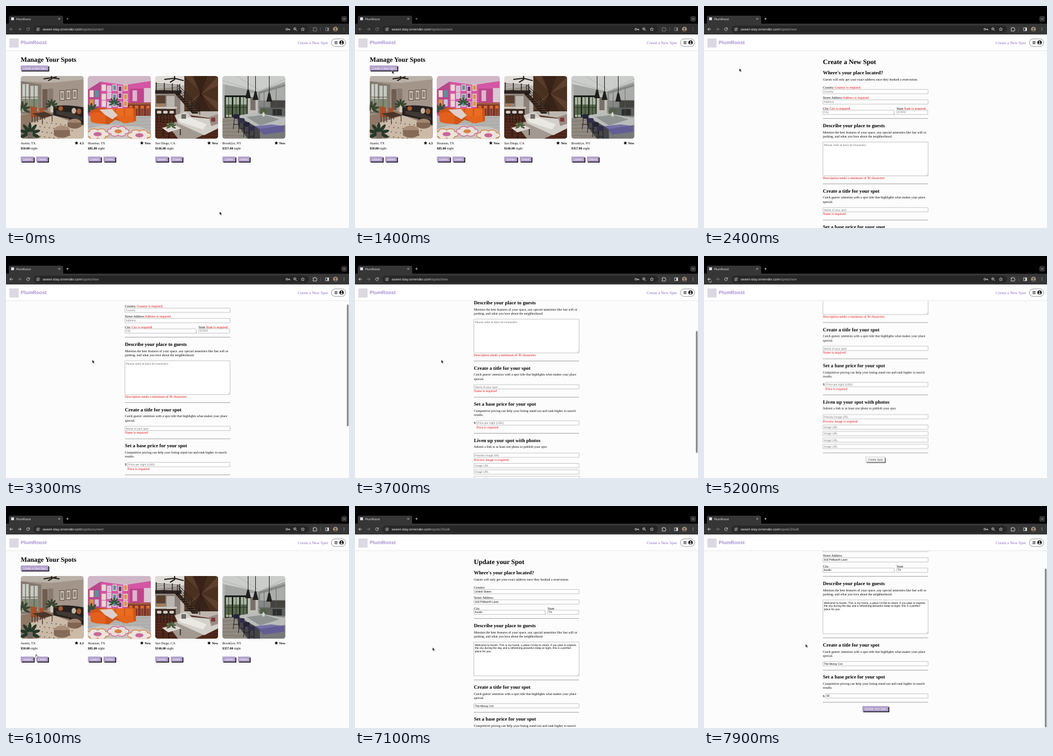
Animation of 600x390 px, one loop 8 s. Source, as an HTML page:

```html
<!DOCTYPE html>
<html lang="en">
<head>
<meta charset="utf-8">
<title>Manage Your Spots</title>
<style>
  html, body { margin: 0; width: 100%; height: 100%; overflow: hidden; background: #fcfcfc; }
  svg { display: block; width: 600px; height: 390px; }
  text { font: 5.8px "Liberation Serif", "Times New Roman", serif; white-space: pre; text-rendering: geometricPrecision; }
  .h1 { font-size: 11.7px; font-weight: bold; }
  .h2 { font-size: 8.75px; font-weight: bold; }
  .ui { font-family: "Liberation Sans", Arial, sans-serif; font-size: 4.83px; }
  .url { font-size: 6.2px; }
  .tab { font-size: 5.3px; }
  .brand { font-size: 8.6px; }
  .link { font-size: 7.05px; }
  .bold { font-weight: bold; }
  .mid { text-anchor: middle; }
  .end { text-anchor: end; }
  .error { fill: #e80000; }
</style>
</head>
<body>
<svg id="stage" viewBox="0 0 600 390"></svg>
<script>
const LOOP = 8000;
const BRAND = 'PlumRoost';

// Drawing helpers
const rect = (x, y, w, h, fill, more = '') =>
  `<rect x="${x}" y="${y}" width="${w}" height="${h}" fill="${fill}" ${more}/>`;
const round = (x, y, w, h, r, fill, more = '') => rect(x, y, w, h, fill, `rx="${r}" ${more}`);
const path = (d, fill, more = '') => `<path d="${d}" fill="${fill}" ${more}/>`;
const line = (d, color, width = 1) => path(d, 'none', `stroke="${color}" stroke-width="${width}"`);
const oval = (x, y, rx, ry, fill, more = '') =>
  `<ellipse cx="${x}" cy="${y}" rx="${rx}" ry="${ry}" fill="${fill}" ${more}/>`;
const ring = (x, y, r, color, width) => oval(x, y, r, r, 'none', `stroke="${color}" stroke-width="${width}"`);
const text = (x, y, value, kind = '', fill = '#000') =>
  `<text x="${x}" y="${y}" class="${kind}" fill="${fill}">${value}</text>`;
const group = (id, content) => `<g id="${id}">${content}</g>`;
const repeat = (n, draw) => Array.from({ length: n }, (_, i) => draw(i)).join('');

function star(cx, cy, r, fill, more) {
  const points = Array.from({ length: 10 }, (_, i) => {
    const a = i * Math.PI / 5, q = i % 2 ? r * .45 : r;
    return [cx + q * Math.sin(a), cy - q * Math.cos(a)].map(v => v.toFixed(2));
  });
  return path('M' + points.join('L') + 'Z', fill, more);
}

function button(x, y, w, label, h = 9) {
  return rect(x + 1.5, y + 1.5, w, h, '#120c18', 'rx=".5"') +
    rect(x, y, w, h, '#b2a0cb', 'rx=".5"') +
    text(x + w / 2, y + h / 2 + 1.7, label, 'ui mid', '#fff');
}

// Room pictures, each 110 by 110
function leaves(x, y, size, color) {
  return repeat(7, i =>
    oval(0, -size * .6, size * .17, size * .5, color, `transform="translate(${x} ${y}) rotate(${i * 38 - 114})"`));
}

function loungeRoom() {
  return rect(0, 0, 110, 110, '#a3958a') +
    path('M0 0H110V6L55 12L0 9Z', '#b9b1a8') +
    path('M0 9L36 15V66H0Z', '#85796e') +
    rect(3, 14, 11, 48, '#c9cec8') + rect(17, 17, 13, 44, '#c3c9c0') +
    rect(3, 40, 11, 20, '#87917b') + rect(17, 40, 13, 19, '#7d8972') +
    line('M3 37H31M8.500 14V62M23.500 17V61', '#574b42', 1) +
    line('M40 5L54 3L68 5M54 0V5L48 8M54 4L63 1', '#211c19', 2) +
    rect(38, 23, 9, 37, '#6f5d50') + rect(48, 22, 9, 33, '#8a7b70') +
    repeat(3, i => rect(68 + i * 11, 25 - i, 9, 18, '#57483f') + rect(69 + i * 11, 26 - i, 7, 16, '#c9bfb2') +
      rect(70.5 + i * 11, 29 - i, 4, 10, '#8f8276')) +
    path('M0 69L45 61L110 78V110H0Z', '#8f7865') +
    path('M12 84L58 69L110 88V110H30Z', '#cbbaa8') +
    repeat(9, i => repeat(4, j => oval(30 + i * 8 - j * 4, 80 + j * 8 + i, 1.3, .8, '#6a574a'))) +
    path('M56 53Q80 49 110 55V86L91 82L84 75L57 69Z', '#25211f') +
    path('M62 61L89 64L108 73V78L63 67Z', '#3f3833') +
    oval(70, 57, 4, 4, '#a9572f') + oval(93, 61, 4, 5, '#c3b5a4') + oval(102, 62, 4, 5, '#a35430') +
    path('M17 53L28 55L30 72H18Z', '#a9502a') + rect(33, 56, 8, 12, '#a9502a') +
    line('M20 71V81M29 70V80M35 67V77M42 66V76', '#2b1f1a', 1) +
    path('M20 66L42 63L57 69L38 74Z', '#4a3529') + line('M25 69V82M38 73V85M55 69V80', '#2f211a', 1) +
    rect(52, 52, 5, 12, '#cfc8bb') + leaves(54, 51, 10, '#37452f') +
    leaves(3, 58, 13, '#39462f') + leaves(16, 100, 17, '#26392a') + rect(12, 98, 9, 12, '#75695f') +
    oval(94, 82, 12, 7, '#a3866f') + path('M82 82V89Q94 96 106 89V82Z', '#806551') +
    oval(72, 95, 14, 8, '#a98d77') + path('M58 95V104Q72 113 86 104V95Z', '#846a57');
}

function flower(x, y, size, petal, rim, core) {
  const petals = (grow, color) => repeat(6, i => {
    const a = i * Math.PI / 3;
    return oval(x + size * Math.cos(a), y + size * .42 * Math.sin(a), size * .52 + grow, size * .3 + grow, color);
  });
  return petals(1.4, rim) + petals(0, petal) + oval(x, y, size * .55, size * .28, core);
}

function pinkRoom() {
  const prints = ['#ead9cd', '#57939c', '#d8943f', '#cfc0dc', '#763a74'];
  return rect(0, 0, 110, 110, '#c8529b') +
    path('M0 0H110V9L64 16L22 10L0 24Z', '#cfb8c6') +
    path('M22 10L64 16L110 9V60H22Z', '#d456a4') +
    path('M0 24L22 10V68H0Z', '#b9488c') +
    repeat(4, i => rect(3 + i % 2 * 9, 25 + Math.floor(i / 2) * 16, 7, 12, prints[i])) +
    repeat(15, i => {
      const x = 24 + i % 5 * 9.5, y = 15 + Math.floor(i / 5) * 14 + i % 2 * 2;
      return rect(x, y, 7.5, 11, '#e3d6d5') + rect(x + 1.2, y + 1.4, 5, 8, prints[i * 3 % 5]);
    }) +
    rect(73, 22, 37, 28, '#bd458b') + rect(78, 25, 8, 19, '#dfb5ca') + rect(98, 21, 12, 25, '#d8c9d2') +
    rect(70, 49, 40, 21, '#7c342d') + rect(70, 47, 40, 3, '#a15e3c') +
    repeat(4, i => rect(72 + i * 10, 52, 6, 5, '#d96c2c') +
      line(`M${73 + i * 10} 57V72M${77 + i * 10} 57V72`, '#b27743', 1)) +
    path('M0 70H110V110H0Z', '#b2b3b1') +
    repeat(6, i => line(`M0 ${77 + i * 6}L110 ${73 + i * 6}`, '#9c9d9b', .6)) +
    leaves(46, 47, 9, '#34553b') + leaves(6, 60, 12, '#33503a') +
    path('M4 62Q18 53 31 57H63Q76 52 84 59V79L68 83L48 77L36 85L7 81Z', '#ce5518') +
    path('M33 57H47V70H33ZM49 57H63V71H49ZM65 57H79V72H65Z', '#e96c20') +
    path('M4 66Q17 60 31 68V82Q18 86 5 80Z', '#e2601b') + path('M47 71L80 69V81L62 83Z', '#e5651d') +
    path('M20 59L42 58L52 69L43 76L31 69Z', '#ddd0cc') +
    path('M0 93Q25 82 66 88Q107 87 110 103V110H0Z', '#c9c4bf') +
    flower(17, 102, 13, '#ebe3dd', '#d9813f', '#c86895') +
    flower(53, 97, 12, '#e8deda', '#cd6c9b', '#d9813f') +
    flower(90, 104, 13, '#ebe3dd', '#d9813f', '#c86895');
}

function stairRoom() {
  return rect(0, 0, 110, 110, '#bdb7b0') +
    path('M0 0H52V16L0 24Z', '#dedad4') +
    path('M51 0H110V62H51Z', '#49301f') +
    path('M80 31L51 0H66ZM80 31L110 0V17ZM80 31L51 50V62ZM80 31L110 45V62Z', '#5e402c') +
    path('M80 31L66 0H92ZM80 31L64 62H97Z', '#3a2418') +
    repeat(10, i => line(`M80 31L${51 + i * 6.5} 0M80 31L${51 + i * 6.5} 62`, '#2c1b14', .5)) +
    line('M16 6L34 4L50 8M34 0V6L26 11', '#1f1b18', 2) +
    rect(0, 25, 46, 6, '#2d2421') +
    repeat(5, i => line(`M0 ${13 + i * 2.6}L43 ${16 + i * 2.6}`, '#322a25', .7)) +
    line('M2 11V31M16 12V31M30 13V31M43 14V36', '#231e1b', 1.4) +
    rect(0, 31, 44, 38, '#8d837b') + rect(2, 34, 16, 14, '#5a402f') + rect(20, 35, 14, 23, '#bbb6af') +
    rect(0, 58, 36, 14, '#38261e') + rect(0, 54, 38, 3, '#cfc8bf') + rect(6, 49, 5, 4, '#c9702f') +
    path('M33 29L41 29L76 66H65Z', '#211c19') +
    repeat(8, i => rect(37 + i * 4, 34 + i * 4, 12, 1.6, '#59392a')) +
    line('M39 15L78 53M41 21L77 58M43 27L76 62M39 15V34M51 27V46M64 40V61M78 53V68', '#1d1917', 1) +
    path('M0 71L48 67L110 76V110H0Z', '#532a1d') +
    repeat(7, i => line(`M0 ${75 + i * 5}L110 ${82 + i * 5}`, '#341912', .8)) +
    path('M20 84L50 78L92 100L70 110H40Z', '#a29990') +
    path('M34 69L53 63L64 72L96 75L110 68V92L86 104L40 83Z', '#d3d0ca') +
    path('M40 75L60 73L90 85L84 94L44 81Z', '#eae8e3') +
    path('M94 72L110 67V84L98 88Z', '#9d8b84') + rect(46, 67, 8, 8, '#716a64') + rect(98, 73, 7, 7, '#7c3a37') +
    path('M12 91L34 86L46 92L23 99Z', '#dcd8d2') + line('M14 93V106M24 99V110M44 93V104', '#1f1613', 1.4) +
    repeat(3, i => round(3 + i * 11, 61, 8, 5, 2, '#d1c9c1') +
      line(`M${4 + i * 11} 66V82M${10 + i * 11} 66V82`, '#1d1613', 1)) +
    leaves(28, 88, 8, '#485a37');
}

function kitchenRoom() {
  return rect(0, 0, 110, 110, '#a2a4a1') +
    path('M0 0H110V10L62 27L0 14Z', '#cbcdca') +
    line('M0 8L58 26M25 0L65 25M110 5L66 26', '#b1b3b0', 1) +
    rect(0, 14, 4, 62, '#b5b6b3') + rect(4, 34, 40, 40, '#171b18') +
    repeat(3, i => rect(6 + i * 13, 37, 10.5, 35, '#a9b5a0') + rect(6 + i * 13, 50, 10.5, 18, '#56684a')) +
    line('M4 55H44M11 37V72M24 37V72M37 37V72', '#20261f', .8) +
    rect(45, 30, 17, 42, '#c2bfb8') + rect(49, 37, 9, 23, '#777069') +
    path('M63 28L110 14V72H63Z', '#858784') + path('M66 31L80 27V43H66ZM83 26L110 18V42H83Z', '#aaaca9') +
    rect(84, 43, 26, 13, '#45433f') + rect(66, 56, 44, 14, '#5e605e') + rect(88, 58, 16, 11, '#2d2e2e') +
    line('M73 28V70M94 22V70M63 55H110', '#575a56', .7) +
    path('M0 74L62 69L110 76V110H0Z', '#918a80') +
    repeat(5, i => line(`M0 ${80 + i * 6}L55 ${74 + i * 8}`, '#746d65', .8)) +
    path('M26 70L57 64L110 74V86L66 93Z', '#b9bcb9') +
    path('M42 72L73 68L100 76L66 87Z', '#8f9493') +
    path('M26 71L66 93V110H44L28 88Z', '#454548') + path('M66 93L110 86V110H66Z', '#77797a') +
    path('M58 88L86 85L108 88V98L72 103Z', '#5a52a0', 'opacity=".7"') +
    repeat(4, i => {
      const x = 19 + i * 9, y = 67 + i * 7;
      return round(x, y, 11, 8, 3, i % 2 ? '#302d4b' : '#262439') +
        line(`M${x + 2} ${y + 8}L${x} ${y + 26}M${x + 9} ${y + 8}L${x + 10} ${y + 26}M${x} ${y + 18}H${x + 10}`, '#1d1b24', 1);
    }) +
    repeat(3, i => {
      const x = 45 + [0, 13, 37][i], y = 24 + i * 3;
      return line(`M${x} 0V${y}`, '#1c1c1c', 1) + path(`M${x - 1.5} ${y}H${x + 1.5}L${x + 5} ${y + 15}H${x - 5}Z`, '#1f1f1f');
    }) +
    rect(70, 63, 4, 8, '#d6d4cc') + leaves(72, 63, 7, '#4f6142');
}

// Page views
function card(i, room, city, price, rating) {
  const x = 25.7 + 117.6 * i, right = x + 110.2;
  const ratingWidth = rating === 'New' ? 15.9 : 12.6;
  return `<g transform="translate(${x} 123.1)" clip-path="url(#frame)">${room()}</g>` +
    text(x, 243, city) + text(right, 243, rating, 'bold end') +
    star(right - ratingWidth, 240.8, 3.4, '#000') +
    text(x, 252, `<tspan class="bold">${price}</tspan> night`) +
    button(x + .1, 264.4, 22.8, 'Update') + button(x + 27.3, 264.4, 20.6, 'Delete');
}

const spotsPage = () =>
  text(25.7, 97.8, 'Manage Your Spots', 'h1') + button(25.8, 104.4, 48.3, 'Create a New Spot') +
  card(0, loungeRoom, 'Austin, TX', '$50.00', '4.3') +
  card(1, pinkRoom, 'Houston, TX', '$85.00', 'New') +
  card(2, stairRoom, 'San Diego, CA', '$146.00', 'New') +
  card(3, kitchenRoom, 'Brooklyn, NY', '$357.00', 'New');

function formPage(values) {
  const LEFT = 208;
  const rule = y => rect(LEFT, y - .4, 184, .8, '#8f8f8f');
  const error = (x, y, message) => values ? '' : text(x, y, message, 'error');
  const label = (x, y, name, short = name) =>
    text(x, y, values ? name : `${name} <tspan class="error">${short} is required</tspan>`);
  const entry = (x, y, value) => text(x, y, value, 'ui', values ? '#000' : '#707070');
  const box = (x, y, w, h) => round(x, y, w, h, .6, '#fff', 'stroke="#8a8a8a" stroke-width=".5"');
  const field = (x, y, w, hint, key) =>
    box(x, y, w, 7.5) + entry(x + 1.6, y + 5.4, values ? values[key] : hint);
  const section = (y, title, ...lines) => rule(y) + text(LEFT, y + 15, title, 'h2') +
    lines.map((s, i) => text(LEFT, y + 25.8 + i * 7.2, s)).join('');
  const gap = values ? 0 : 6.9;

  let out = text(LEFT, 101.9, values ? 'Update your Spot' : 'Create a New Spot', 'h1') +
    text(LEFT, 120.3, "Where's your place located?", 'h2') +
    text(LEFT, 131, 'Guests will only get your exact address once they booked a reservation.') +
    label(LEFT, 145, 'Country') + field(LEFT, 146.6, 184, 'Country', 'country') +
    label(LEFT, 163.2, 'Street Address', 'Address') + field(LEFT, 164.8, 184, 'Address', 'address') +
    label(LEFT, 181.6, 'City') + field(LEFT, 183, 124.5, 'City', 'city') + text(332.8, 190.4, ',') +
    label(337, 181.6, 'State') + field(337, 183, 54.5, 'STATE', 'state');

  let y = 197.7;
  out += section(y, 'Describe your place to guests',
    'Mention the best features of your space, any special amenities like fast wifi or',
    'parking, and what you love about the neighborhood.') +
    box(LEFT, 239, 184, 59.3) +
    line('M389 297.5L391.3 295.2M390.4 297.5L391.3 296.6', '#777', .4) +
    (values ? values.about : ['Please write at least 30 characters'])
      .map((s, i) => entry(209.8, 245.6 + i * 5.7, s)).join('') +
    error(LEFT, 303.8, 'Description needs a minimum of 30 characters');

  y = 305.7 + gap;
  out += section(y, 'Create a title for your spot',
    "Catch guests' attention with a spot title that highlights what makes your place", 'special.') +
    field(LEFT, y + 41.5, 184, 'Name of your spot', 'title') + error(LEFT, y + 54.8, 'Name is required');

  y += 56.6 + gap;
  out += section(y, 'Set a base price for your spot',
    'Competitive pricing can help your listing stand out and rank higher in search', 'results.') +
    text(LEFT, y + 47.3, '$') + field(212.6, y + 41.5, 179.2, 'Price per night (USD)', 'price') +
    error(212.6, y + 54.8, 'Price is required');

  y += 56.6 + gap;
  if (values) return out + rule(y) + button(277, y + 6.6, 45.6, 'Update Your Spot', 9.2);

  out += section(y, 'Liven up your spot with photos', 'Submit a link to at least one photo to publish your spot.') +
    field(LEFT, y + 34.6, 184, 'Preview Image URL') + error(LEFT, y + 48, 'Preview image is required') +
    repeat(4, i => field(LEFT, y + 52.8 + i * 11.35, 184, 'Image URL')) + rule(y + 102);
  return out + rect(284.5, y + 110.6, 33.4, 9, '#555') +
    rect(283, y + 109, 33.6, 9.2, '#f6f6f6', 'stroke="#999" stroke-width=".4"') +
    text(299.8, y + 115.3, 'Create Spot', 'ui mid', '#444');
}

// Browser frame and site header
function browser() {
  const ink = '#dedede', dim = '#858585';
  const address = (id, tail) => group(id,
    text(64, 43.1, `sweet-stay.onrender.com<tspan fill="#a9a9a9">${tail}</tspan>`, 'ui url', '#eee'));
  const bar = color => rect(0, 31, 600, 19, color) +
    path('M2 32Q5 32 5 29V20Q5 17 8 17H97Q100 17 100 20V29Q100 32 103 32Z', color);
  // Icons that fade while the window is in the background
  const controls = color =>
    line('M105.6 22.5H109.6M107.6 20.5V24.5', color, .8) +
    line('M12 40.8H6.7M9.2 38.2L6.6 40.8L9.2 43.4', color, .9) +
    line('M40.4 39A2.5 2.5 0 1 0 41 41.3M41 38V40H39', color, .9) +
    path('M537.2 38.5H539A1.1 1.1 0 0 1 541.2 38.5H543V40.3A1.1 1.1 0 0 1 543 42.5V44H537.2V42A1 1 0 0 0 537.2 40Z',
      'none', `stroke="${color}" stroke-width=".9"`) +
    rect(559.1, 38.2, 5.4, 5.2, 'none', `stroke="${color}" stroke-width=".8"`) + rect(562, 38.2, 2.5, 5.2, color) +
    repeat(3, i => oval(591.2, 38.6 + i * 2.2, .6, .6, color));
  const forward = color => line('M21 40.8H26.3M23.8 38.2L26.4 40.8L23.8 43.4', color, .9);

  return rect(0, 0, 600, 50, '#000') +
    group('idle', bar('#2f2f2f') + controls(dim)) + group('active', bar('#363636') + controls(ink)) +
    rect(9, 20, 5, 5, '#dcd8e3') + text(17.5, 24.5, BRAND, 'ui tab', '#e5e5e5') +
    line('M91.5 20.9L94.7 24.1M94.7 20.9L91.5 24.1', ink, .7) +
    round(586.5, 17.5, 10, 10, 3.5, '#333') + line('M589.8 21.8L591.5 23.5L593.2 21.8', ink, .8) +
    group('forwardOff', forward(dim)) + group('forwardOn', forward(ink)) +
    round(48, 34.5, 482, 12.8, 6.4, '#262626') + oval(56, 40.8, 4.6, 4.6, '#393939') +
    line('M53.7 39.5H56M53.7 42.3H54M55.7 42.3H58.5', ink, .7) +
    ring(57.3, 39.5, .9, ink, .6) + ring(54.8, 42.3, .9, ink, .6) +
    address('urlSpots', '/spots/current') + address('urlNew', '/spots/new') + address('urlEdit', '/spots/2/edit') +
    ring(491.2, 40.8, 1.6, ink, .9) + line('M492.8 40.8H496.5V42.5M495 41V42.5', ink, .9) +
    ring(505.3, 40.1, 2, ink, .8) + line('M506.8 41.6L509 43.8M504.3 40.1H506.3', ink, .8) +
    star(519.2, 41, 3.1, 'none', `stroke="${ink}" stroke-width=".7"`) +
    rect(550.2, 37.5, .6, 6.5, '#666') +
    oval(576.3, 40.8, 4.2, 4.2, '#a99682') + oval(576.3, 39.7, 1.6, 1.8, '#61483a') +
    path('M573.4 43.6Q576.3 39.9 579.2 43.6Q576.3 46 573.4 43.6Z', '#61483a');
}

const header = () => rect(0, 50, 600, 28, '#fff') + rect(0, 78, 600, .8, '#e4e4e4') +
  rect(6, 57, 16, 16, '#dcd8e3') +
  text(25.8, 67.4, BRAND, 'ui bold brand', '#a98fd2') +
  text(510.2, 66.6, 'Create a New Spot', 'link', '#9068cc') +
  round(569.2, 57.8, 25, 13.2, 6.6, '#fff', 'stroke="#555" stroke-width=".6"') +
  line('M574.7 62.5H579.8M574.7 64.4H579.8M574.7 66.3H579.8', '#111', .9) +
  oval(587, 64.3, 3.8, 3.8, '#111') + oval(587, 63.1, 1.2, 1.2, '#fff') +
  path('M584.8 66.7Q587 63.5 589.2 66.7Q587 68.2 584.8 66.7Z', '#fff');

const thumb = (id, height) => group(id, round(596.3, 50, 3, height, 1.5, '#858585'));

const pointer = group('cursor',
  group('arrow', path('M0 0V6L1.4 4.8L2.4 7.1L3.5 6.6L2.5 4.4H4.3Z', '#000', 'stroke="#fff" stroke-width=".5"')) +
  group('hand', path('M1.3 4V.7Q1.9 0 2.4 .7V2.8L4.6 3.3Q5.2 3.6 4.9 4.8L4.3 6.7H1.9L0 4.2Q.4 3.3 1.3 4Z', '#fff', 'stroke="#000" stroke-width=".55"')));

const guestHouse = {
  country: 'United States', address: '418 Pellworth Lane', city: 'Austin', state: 'TX', title: 'The Mossy Cot', price: '50',
  about: ["Welcome to Austin. This is my home, a place I'd like to share. If you plan to explore",
    'the city during the day and a refreshing peaceful sleep at night, this is a perfect', 'place for you.']
};

const $ = id => document.getElementById(id);
$('stage').innerHTML =
  `<defs><clipPath id="frame">${round(0, 0, 110.2, 110.2, 5, '#000')}</clipPath></defs>` +
  rect(0, 0, 600, 390, '#fcfcfc') +
  group('spots', spotsPage()) +
  group('create', group('createBody', formPage()) + thumb('createThumb', 214)) +
  group('edit', group('editBody', formPage(guestHouse)) + thumb('editThumb', 279)) +
  header() + browser() + pointer;

// Motion: tables of [time, value]
function play(id, property, steps, easing = 'linear') {
  const frames = [...steps, [LOOP, steps.at(-1)[1]]]
    .map(([time, value]) => ({ offset: time / LOOP, [property]: value, easing }));
  $(id).animate(frames, { duration: LOOP, iterations: Infinity });
}
const toggle = (id, ...steps) => play(id, 'opacity', steps, 'step-end');
const move = (id, steps) => play(id, 'transform', steps.map(([t, x, y]) => [t, `translate(${x}px, ${y}px)`]));
const scroll = (id, steps, factor) => move(id, steps.map(([t, y]) => [t, 0, y * factor]));

const OPEN = 1700, BACK = 5300, EDIT = 6600;
for (const id of ['spots', 'urlSpots']) toggle(id, [0, 1], [OPEN, 0], [BACK, 1], [EDIT, 0]);
for (const id of ['create', 'urlNew']) toggle(id, [0, 0], [OPEN, 1], [BACK, 0]);
for (const id of ['edit', 'urlEdit']) toggle(id, [0, 0], [EDIT, 1]);
toggle('forwardOff', [0, 1], [BACK, 0], [EDIT, 1]);
toggle('forwardOn', [0, 0], [BACK, 1], [EDIT, 0]);
toggle('idle', [0, 1], [OPEN, 0]);
toggle('active', [0, 0], [OPEN, 1]);
toggle('createThumb', [0, 0], [3000, 1], [4900, 0]);
toggle('editThumb', [0, 0], [7400, 1]);
toggle('arrow', [0, 1], [6000, 0], [EDIT, 1]);
toggle('hand', [0, 0], [6000, 1], [EDIT, 0]);

const createScroll = [[0, 0], [3000, 0], [3700, 128], [4250, 195.6]];
const editScroll = [[0, 0], [7400, 0], [7800, 74]];
scroll('createBody', createScroll, -1);
scroll('createThumb', createScroll, .638);
scroll('editBody', editScroll, -1);
scroll('editThumb', editScroll, .81);

move('cursor', [
  [0, 373.6, 361], [100, 373.6, 361], [600, 358, 317], [800, 358, 317], [1300, 64.6, 113],
  [1700, 64.6, 113], [2300, 61.7, 109.3], [2600, 61.7, 109.3], [3100, 150.9, 182.2],
  [4700, 150.9, 182.2], [5200, 9, 40], [5500, 9, 40], [6050, 51, 260.2],
  [6700, 51, 260.2], [7300, 177.6, 242.3]
]);
</script>
</body>
</html>
```
